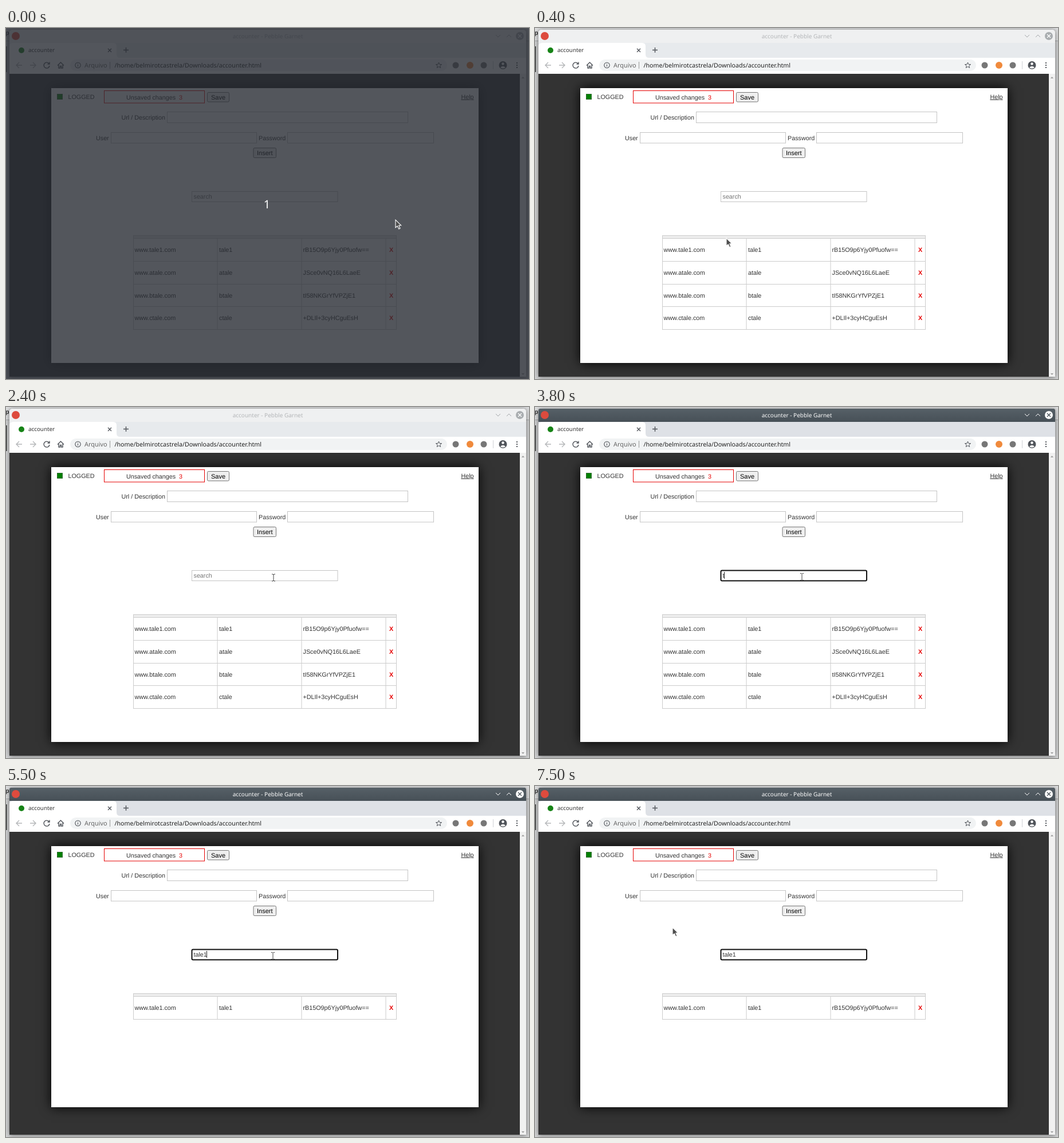
An HTML page for the animation above (8 s loop, 913x613 px).

```html
<!DOCTYPE html>
<html lang="en">
<head>
<meta charset="utf-8">
<title>accounter</title>
<style>
html, body { margin: 0; width: 100%; height: 100%; overflow: hidden; background: #d3d4d5; }
#stage { position: relative; width: 913px; height: 613px; overflow: hidden; }
#stage > * { position: absolute; }
.window { left: 6px; top: 3px; width: 902px; height: 606px; background: #333; border-radius: 4px 4px 0 0; box-shadow: 0 1px 9px rgba(0,0,0,.5); overflow: hidden; }
.card { left: 79px; top: 105px; width: 746px; height: 480px; background: #fff; box-shadow: 0 0 19px #000; }
.filtered .card { height: 456px; }
.title { left: 6px; top: 3px; width: 902px; height: 23px; background: #eff0f1; border-radius: 4px 4px 0 0; }
.tabs { left: 6px; top: 26px; width: 902px; height: 26px; background: #e7eaed; }
.focused .title { background: linear-gradient(#566067, #475057); }
.focused .tabs { background: #dee1e6; }
svg { left: 0; top: 0; }
text { font: 10.75px "Liberation Sans", Arial, sans-serif; fill: #333; text-rendering: geometricPrecision; white-space: pre; }
.ui { font-family: "Noto Sans", "Open Sans", sans-serif; }
.caption { font-size: 10px; fill: #b4b6b8; }
.controls { stroke: #a4a7aa; fill: none; }
.controls circle { fill: #a9adb0; stroke: none; }
.controls .cross { stroke: #fff; stroke-width: 1.3; }
.focused .caption { fill: #fcfcfc; }
.focused .controls { stroke: #fcfcfc; }
.focused .controls circle { fill: #fcfcfc; }
.focused .controls .cross { stroke: #475057; }
.icon { fill: none; stroke: #50545a; stroke-width: 1.4; }
.field { fill: #fff; stroke: #c4c4c4; }
.button { fill: #efefef; stroke: #767676; }
.button + text { fill: #000; font-size: 11px; }
.red { fill: #e60000; }
.line { stroke: #ccc; fill: none; }
.focused #search { stroke: #101010; stroke-width: 2; }
.filtered .extra { display: none; }
#shade { inset: 0; background: rgba(40,44,52,.8); }
#count { font-size: 20px; fill: #fff; }
</style>
</head>
<body>
<div id="stage">
  <svg width="913" height="613">
    <path d="M0 0H913V22H0Z" fill="#dedfe0"/>
    <path d="M0 22.5H913" stroke="#a9abad"/>
    <path d="M0 32H1.5V77H0Z" fill="#333"/>
    <text x="-1" y="12" font-weight="bold" style="font-weight:bold">p</text>
  </svg>
  <div class="window"></div>
  <div class="card"></div>
  <div class="title"></div>
  <div class="tabs"></div>
  <svg width="913" height="613">
    <circle cx="17" cy="14" r="7" fill="#dd4b3e"/>
    <text class="ui caption" x="457" y="18" text-anchor="middle">accounter - Pebble Garnet</text>
    <g class="controls">
      <path d="M855 12l4 4 4-4M874 16l4-4 4 4"/>
      <circle cx="897" cy="14" r="7"/>
      <path class="cross" d="M894 11l6 6m0-6l-6 6"/>
    </g>

    <path d="M6 52V32Q6 26 12 26H187Q193 26 193 32V46Q193 52 199 52H908V80H6Z" fill="#fff"/>
    <circle cx="27" cy="39" r="5" fill="#168316"/>
    <text class="ui" x="39" y="42" style="font-size:9.8px">accounter</text>
    <path class="icon" d="M178 36l6 6m0-6l-6 6M205 38.5h9m-4.5-4.5v9"/>
    <rect x="112" y="55" width="658" height="20" rx="10" fill="#f1f3f4"/>
    <path class="icon" d="M28 65H18m5-5l-5 5 5 5M42 65h10m-5-5l5 5-5 5" style="stroke:#b5b7b9"/>
    <path class="icon" d="M75 62A5 5 0 1 0 76 66M76 59.5V63H72.500M90 65.500l5.500-5.500 5.500 5.500M92 64.500V70H94.500V66.500h2V70H99V64.500"/>
    <g class="icon" style="stroke-width:1.1"><circle cx="125.500" cy="65" r="4.700"/><path d="M125.500 64v3.500m0-5.500v1"/></g>
    <text class="ui" x="137" y="68.500" style="font-size:10.900px;fill:#666">Arquivo</text>
    <path d="M181.500 59V71" stroke="#999"/>
    <text class="ui" x="189.500" y="68.500" style="font-size:10.670px;fill:#222">/home/belmirotcastrela/Downloads/accounter.html</text>
    <path id="star" class="icon" style="stroke-width:1"/>
    <circle cx="785" cy="65" r="5.500" fill="#777"/>
    <circle cx="810" cy="65" r="6" fill="#f08a3c"/>
    <circle cx="834" cy="65" r="5.500" fill="#777"/>
    <path d="M850.500 58V72" stroke="#d0d2d5"/>
    <circle cx="867.500" cy="65" r="7" fill="#50545a"/>
    <circle cx="867.500" cy="62.500" r="2.200" fill="#fff"/>
    <path d="M863 69Q867.500 64.500 872 69Q867.500 72.500 863 69Z" fill="#fff"/>
    <path d="M891 60h2v2h-2zm0 4h2v2h-2zm0 4h2v2h-2z" fill="#50545a"/>

    <path d="M897 80H908V609H897Z" fill="#f1f1f1"/>
    <path d="M900 88l2.500-3 2.500 3zM900 603l2.500 3 2.500-3z" fill="#a0a0a0"/>

    <rect x="89.500" y="115.500" width="9" height="9" fill="green" stroke="#2d6b2d"/>
    <text x="108.500" y="123.700">LOGGED</text>
    <rect x="171.500" y="109.500" width="175" height="21.500" fill="#fff" stroke="#e60000"/>
    <text x="210" y="124.500">Unsaved changes  <tspan class="red" x="302">3</tspan></text>
    <rect class="button" x="351.500" y="112.500" width="38" height="16.500" rx="2"/>
    <text x="358" y="124.500">Save</text>
    <text x="816.500" y="123.700" text-anchor="end" text-decoration="underline">Help</text>

    <text x="201.500" y="160">Url / Description</text>
    <rect class="field" x="281.500" y="146.500" width="420" height="19"/>
    <text x="157" y="195.500">User</text>
    <rect class="field" x="183.500" y="182.500" width="254" height="18.500"/>
    <text x="441" y="195.500">Password</text>
    <rect class="field" x="491.500" y="182.500" width="255" height="18.500"/>
    <rect class="button" x="432" y="209.500" width="39.500" height="17" rx="2"/>
    <text x="438" y="222">Insert</text>

    <rect id="search" class="field" x="324.500" y="285.500" width="254.500" height="18" rx="0"/>
    <text id="query" x="327.500" y="298"></text>
    <path id="caret" stroke="#222"/>

    <rect x="222" y="362" width="460" height="5.500" fill="#eee"/>
    <path class="line" d="M222 362.500H682"/>
    <g id="rows"></g>
  </svg>
  <div id="shade"></div>
  <svg width="913" height="613">
    <text id="count" class="ui" x="455.500" y="314.500" text-anchor="middle">1</text>
    <path id="arrow" d="M0 0V13.500L3.300 10.800 5.800 16 8 15 5.800 9.700H9.700Z" fill="#4d4d4d" stroke="#fff" stroke-width="1.100"/>
    <path id="beam" d="M-3-6H-1L0-5 1-6H3M0-5V5M-3 6H-1L0 5 1 6H3" fill="none" stroke="#444"/>
  </svg>
</div>
<script>
const $ = id => document.getElementById(id);
const LOOP = 8000;

const accounts = [
  ['tale1', 'rB15O9p6Yjy0Pfuofw=='],
  ['atale', 'JSce0vNQ16L6LaeE'],
  ['btale', 'tI58NKGrYfVPZjE1'],
  ['ctale', '+DLIl+3cyHCguEsH']
];
$('rows').innerHTML = accounts.map(([user, secret], i) => {
  const top = Math.round(367 + i * 39.75) + .5, bottom = Math.round(406.75 + i * 39.75) + .5, y = top + 23.8;
  return `<g class="${i ? 'extra' : ''}">
    <path class="line" d="M222 ${top}H682M222 ${bottom}H682M222.500 362V${bottom}M369 ${top}V${bottom}M516 ${top}V${bottom}M663 ${top}V${bottom}M681.500 362V${bottom}"/>
    <text x="224.500" y="${y}">www.${user}.com</text>
    <text x="372" y="${y}">${user}</text>
    <text x="518.500" y="${y}">${secret}</text>
    <text class="red" x="672.500" y="${y}" text-anchor="middle" style="font-weight:bold">X</text></g>`;
}).join('');

$('star').setAttribute('d', 'M' + Array.from({ length: 10 }, (_, i) => {
  const r = i % 2 ? 2.3 : 5.3, a = i * Math.PI / 5;
  return `${755.5 + r * Math.sin(a)} ${65.3 - r * Math.cos(a)}`;
}).join('L') + 'Z');

// Pointer keys: time, x, y
const pointer = [
  [0, 680, 335], [200, 680, 335], [300, 564, 328], [400, 334, 367],
  [600, 245, 430], [900, 290, 512], [1100, 395, 525], [1300, 540, 530],
  [1500, 655, 480], [1600, 678, 405], [1800, 588, 298], [2000, 475, 328],
  [2100, 471, 312], [2200, 468, 301], [2400, 467, 298], [2600, 467, 298],
  [2700, 466, 296.5], [5800, 466, 296.5], [5900, 453, 291], [6100, 365, 205],
  [6300, 250, 125], [6500, 155, 50], [6700, 93, 85], [6800, 100, 105],
  [7000, 90, 52], [7200, 160, 112], [7400, 225, 215], [7500, 240, 247], [LOOP, 240, 247]
];

function pointerAt(t) {
  const i = pointer.findIndex(key => key[0] > t);
  const a = pointer[i - 1], b = pointer[i], u = (t - a[0]) / (b[0] - a[0]);
  return [a[1] + (b[1] - a[1]) * u, a[2] + (b[2] - a[2]) * u];
}

const keystrokes = [3800, 4000, 4500, 5000, 5300];
const caretResets = [2700, ...keystrokes, 5500];
const show = (el, on) => { el.style.display = on ? '' : 'none'; };

function draw(now) {
  const t = Math.floor(now % LOOP / 100) * 100;
  const focused = t >= 2700;
  $('stage').classList.toggle('focused', focused);
  $('stage').classList.toggle('filtered', t >= 5500);
  show($('shade'), t < 400);
  show($('count'), t < 400);
  $('search').setAttribute('rx', focused ? 2 : 0);

  const typed = keystrokes.filter(k => k <= t).length;
  const query = $('query');
  query.textContent = typed ? 'tale1'.slice(0, typed) : 'search';
  query.style.fill = typed ? '#333' : '#757575';

  const lastReset = Math.max(...caretResets.filter(k => k <= t));
  const blinkOn = t >= 7500 ? false : Math.floor((t - lastReset) / 500) % 2 === 0;
  show($('caret'), focused && blinkOn && !(t >= 3700 && t < 3800));
  const caretX = Math.floor(327.5 + (typed ? query.getComputedTextLength() : 0)) + .5;
  $('caret').setAttribute('d', `M${caretX} 288V300`);

  const [x, y] = pointerAt(t);
  const overSearch = x > 324 && x < 579 && y > 285 && y < 304;
  show($('arrow'), !overSearch);
  show($('beam'), overSearch);
  $(overSearch ? 'beam' : 'arrow').setAttribute('transform', `translate(${x} ${y})`);
}

function tick() {
  draw(performance.now());
  requestAnimationFrame(tick);
}
tick();
</script>
</body>
</html>
```
